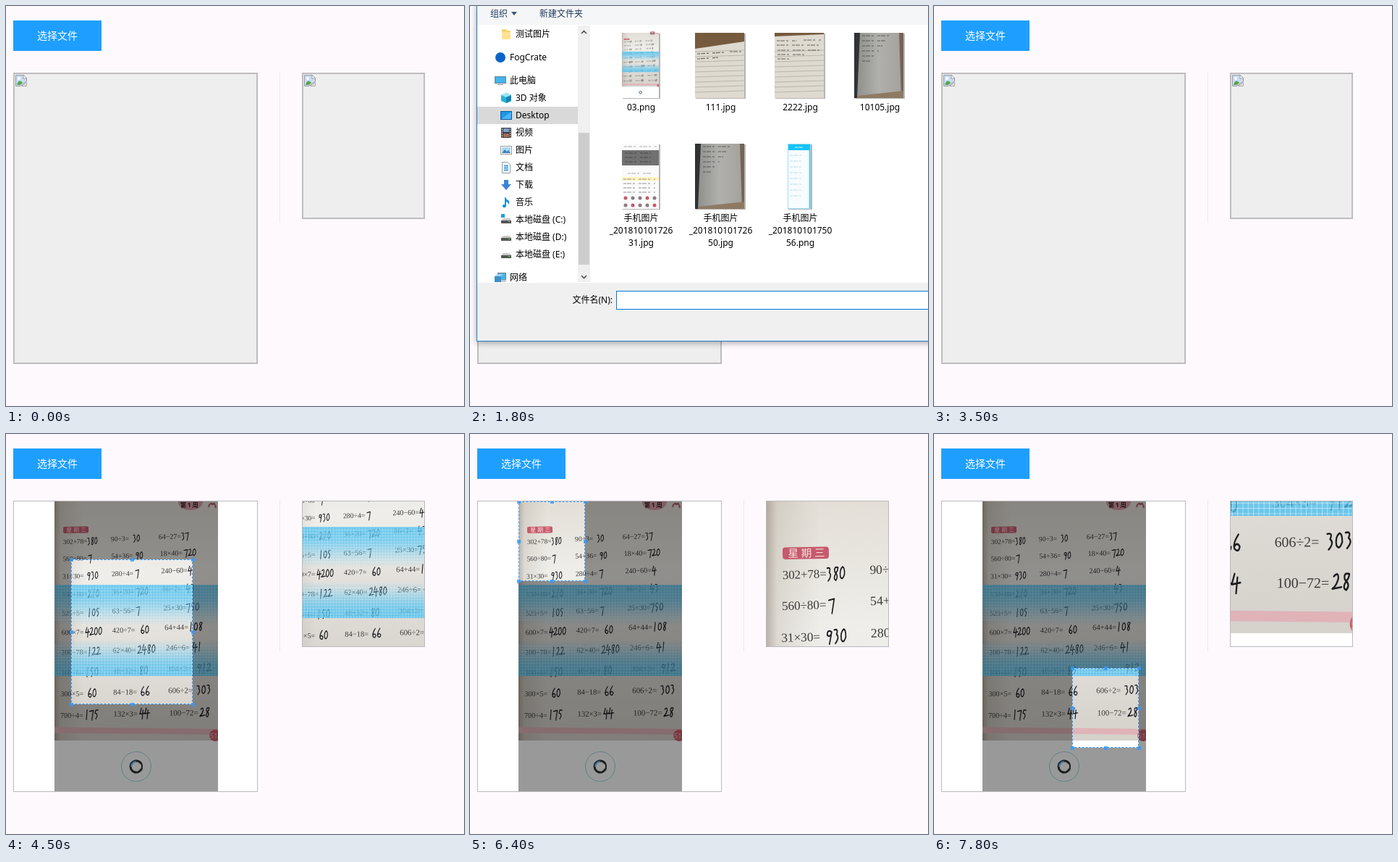
These frames come from a looping animation (633 px wide and 552 px high, 8 s). An HTML page:

```html
<!DOCTYPE html>
<html lang="zh">
<head>
<meta charset="utf-8">
<style>
html, body { margin: 0; width: 100%; height: 100%; overflow: hidden; background: #fef9fd; }
svg { display: block; }
text { font: 12px 'Noto Sans', 'Noto Sans CJK SC', 'Noto Sans CJK', sans-serif; white-space: pre; }
.print { font-family: 'Liberation Serif', serif; fill: #3c3a38; }
.hand { fill: none; stroke: #1c1c20; stroke-width: 1.1; stroke-linecap: round; stroke-linejoin: round; }
</style>
</head>
<body>
<svg id="stage" width="633" height="552"></svg>
<script>
const rect = (x, y, w, h, fill, more = '') =>
  `<rect x="${x}" y="${y}" width="${w}" height="${h}" fill="${fill}" ${more}/>`;
const path = (d, fill, more = '') => `<path d="${d}" fill="${fill}" ${more}/>`;
const line = (d, color, width = 1, more = '') =>
  path(d, 'none', `stroke="${color}" stroke-width="${width}" ${more}`);
const circle = (x, y, r, fill, more = '') => `<circle cx="${x}" cy="${y}" r="${r}" fill="${fill}" ${more}/>`;
const text = (x, y, s, more = '') => `<text x="${x}" y="${y}" ${more}>${s}</text>`;
const group = (x, y, body) => `<g transform="translate(${x} ${y})">${body}</g>`;
const frame = (x, y, w, h, color) => rect(x + .5, y + .5, w - 1, h - 1, 'none', `stroke="${color}"`);
const range = (n, f) => Array.from({ length: n }, (_, i) => f(i)).join('');
const gradient = (id, dir, ...stops) =>
  `<linearGradient id="${id}" x2="${dir == 'x' ? 1 : 0}" y2="${dir == 'y' ? 1 : 0}">` +
  stops.map(([at, c, a = 1]) => `<stop offset="${at}" stop-color="${c}" stop-opacity="${a}"/>`).join('') +
  '</linearGradient>';

// ---- worksheet photo: printed sums, handwritten answers (sum=answer,answer x) ----
const sums = `302+78=380,112 90÷3=30,175 64−27=37,242
560÷80=7,114 54+36=90,179 18×40=720,246
31×30=930,112 280÷4=7,179 240−60=4,252
130+80=210,113 36×20=720,180 86÷2=43,249
525÷5=105,113 63−56=7,180 25×30=750,249
600×7=4200,110 420÷7=60,186 64+44=108,253
200−78=122,113 62×40=2480,182 246÷6=41,258
300÷6=150,110 48+32=80,184 304×3=912,264
300×5=60,113 84−18=66,186 606÷2=303,263
700÷4=175,109 132×3=44,185 100−72=28,268`.split('\n').map(row => row.split(' '));

const digits = [
  'M3 1Q0 3 1 8Q3 11 5 6Q5 1 3 1', 'M3 0L2 10', 'M1 2Q4-1 4 3Q3 7 0 9L6 8',
  'M1 1Q5 0 3 4Q6 6 2 10', 'M2 0L0 6L6 5M4 2L3 11', 'M5 1L2 1L1 4Q6 5 2 10',
  'M4 0Q0 5 1 8Q4 11 5 7Q3 4 1 7', 'M0 2L5 1L3 11',
  'M5 1Q1 0 2 4Q6 7 3 10Q0 9 3 5Q5 3 5 1', 'M5 2Q1 0 1 4Q4 6 5 2L3 10'];

function sum(item, r, c) {
  const [, print, answer, answerX] = item.match(/(.+=)(\d+),(\d+)/);
  const x = [79, 145, 211][c] + r * [-.45, .4, 1.65][c];
  const y = [149, 145, 142][c] + r * [23, 23.2, 22.5][c] + r * r * [.4, .4, .5][c];
  const size = 9.2 + .35 * c + .12 * r, step = 5 + .17 * r + .3 * c, tall = 1.08 + .03 * r;
  const hand = [...answer].map((d, i) =>
    `<path class="hand" d="${digits[d]}" transform="translate(${+answerX + i * step} ${y - 1 - 5 * tall - i * .5}) scale(${step / 6.3} ${tall})"/>`);
  return text(x, y + size * .33, print,
    `class="print" style="font-size:${size}px" transform="rotate(${-2 + .2 * r} ${x} ${y})"`) + hand.join('');
}

const page = rect(67, 93, 226, 400, '#fff') + rect(67, 93, 226, 330, 'url(#paper)') +
  rect(67, 93, 40, 330, 'url(#spine)') +
  '<ellipse cx="255" cy="94" rx="17" ry="11" fill="#d79aa3"/>' +
  text(241, 101, '第 1 周', 'style="font-size:8px;font-weight:bold" fill="#2c2022"') +
  line('M280 101q1-6 5-4q4-2 5 5M282 96h7', '#b8606c', 2) +
  group(79, 128, `<g transform="rotate(-1)">${rect(0, 0, 35, 9, '#c65a6c', 'rx="2"')}` +
    text(4, 7.4, '星期三', 'style="font-size:8px;letter-spacing:2px" fill="#f8e4e2"') + '</g>') +
  sums.map((row, r) => row.map((item, c) => sum(item, r, c)).join('')).join('') +
  path('M67 404.5L293 407V415L67 412.5Z', '#dfb3b7') +
  path('M293 409A8 8 0 1 0 293 423Z', '#c9606a') +
  text(282, 420, '51', 'style="font-size:9px" fill="#e8c0c0"') +
  rect(67, 208, 226, 56, 'url(#scanDown)') + rect(67, 208, 226, 50, 'url(#gridDown)') +
  rect(67, 284, 226, 50, 'url(#scanUp)') + rect(67, 290, 226, 44, 'url(#gridDown)') +
  circle(180, 459, 20.5, 'none', 'stroke="#9fd6da"') +
  circle(180, 459, 8, 'none', 'stroke="#2e3436" stroke-width="3" stroke-dasharray="43 8" transform="rotate(20 180 459)"') +
  line('M173 459a7 7 0 0 1 7-7', '#58b8e0', 2) + line('M186 453l2 4v5', '#333', 2);

const defs = '<defs>' +
  gradient('paper', 'y', [0, '#e3dfd7'], [.3, '#efeeea'], [.6, '#e2dfda'], [1, '#d5d1cb']) +
  gradient('spine', 'x', [0, '#6b5a45', .4], [.2, '#6b5a45', .13], [1, '#6b5a45', 0]) +
  gradient('scanDown', 'y', [0, '#4cc0f0', .8], [.35, '#4cc0f0', .7], [1, '#4cc0f0', 0]) +
  gradient('scanUp', 'y', [0, '#4cc0f0', 0], [.65, '#4cc0f0', .7], [1, '#4cc0f0', .82]) +
  gradient('desk', 'x', [0, '#8b8b88'], [.5, '#b0b0ac'], [1, '#a3a19c']) +
  `<pattern id="gridDown" width="4" height="4" patternUnits="userSpaceOnUse">${line('M0 .3H4M.3 0V4', '#fff', .5, 'opacity=".5"')}</pattern>` +
  '<clipPath id="panelClip"><rect x="11" y="93" width="336" height="400"/></clipPath>' +
  '<clipPath id="treeClip"><rect x="10" y="27" width="139" height="354"/></clipPath>' +
  `<g id="page">${page}</g></defs>`;

// ---- upload page ----
const broken = (x, y) => group(x, y,
  path('M.5 .5H11L15.5 5V9L6 15.5H.5Z', '#c6dcf6', 'stroke="#9a9a9a"') +
  path('M2 14Q4 7 8 9L10 11L6 14Z', '#58a548') + path('M11 0V5H16Z', '#fff', 'stroke="#9a9a9a"') +
  circle(5, 5, 2, '#fff') + path('M8 15.5L15.5 10.5V15.5Z', '#e4e4e4', 'stroke="#aaa"'));
const edge = '#bbb9bd';
const base = rect(0, 0, 633, 552, '#fef9fd') + rect(10, 20, 122, 42, '#1e9fff') +
  text(71, 46, '选择文件', 'fill="#fff" text-anchor="middle" style="font-size:14px"') +
  rect(378, 92, 1, 207, '#eee9ee') +
  rect(10, 92, 338, 402, '#fff') + frame(10, 92, 338, 402, edge) +
  rect(409, 92, 170, 202, '#fff') + frame(409, 92, 170, 202, edge);
const empty = [[11, 93, 336, 400], [410, 93, 168, 200]].map(([x, y, w, h]) =>
  rect(x, y, w, h, '#eee') + frame(x, y, w, h, '#c0c0c0') + broken(x + 2, y + 2)).join('');
const cropper = '<g clip-path="url(#panelClip)"><use href="#page"/>' +
  path('', '#000', 'id="dim" fill-opacity=".4" fill-rule="evenodd"') +
  line('', '#fff', 1, 'id="outline" opacity=".6"') +
  line('', '#39f', 1, 'id="ants" stroke-dasharray="3 2"') + path('', '#39f', 'id="handles" opacity=".8"') + '</g>' +
  '<svg id="preview" x="410" y="93" width="168" height="200" preserveAspectRatio="none"><use href="#page"/></svg>';

// ---- file dialog ----
const disk = path('M1 9L4 6H13L15 9Z', '#c9c9c9') + rect(1, 9, 14, 4, '#555') + rect(11, 10, 2, 1, '#6e6');
const monitor = rect(.5, 2.5, 15, 9, '#41b5f0', 'stroke="#6d7f8c"') + rect(4, 13, 8, 1, '#789');
const icons = {
  folder: path('M2 1H8L9 3H14V15H2Z', '#f9d56e') + rect(2, 5, 12, 10, '#ffe394'),
  cloud: circle(8, 8, 7, '#0a64c8'),
  pc: monitor,
  cube: path('M8 1L15 4V12L8 15L1 12V4Z', '#29b1d8') + path('M8 1L15 4L8 7L1 4Z', '#9be4f5') + path('M8 7L15 4V12L8 15Z', '#1387b5'),
  desktop: rect(.5, 2.5, 15, 11, '#1e96e8', 'stroke="#0d5c99"') + path('M1 13L15 3V13Z', '#4bb4f7'),
  video: rect(1, 1, 14, 14, '#3a3a3e') + rect(4, 2, 8, 5, '#7aa0c8') + rect(4, 9, 8, 5, '#a86a58') +
    line('M2.5 2V15M13.5 2V15', '#ddd', 1, 'stroke-dasharray="2 1"'),
  picture: rect(.5, 2.5, 15, 11, '#fff', 'stroke="#999"') + rect(2, 4, 12, 8, '#a9d8f5') + path('M2 12L6 7L9 10L11 8L14 12Z', '#4080b8'),
  doc: path('M2.5 .5H10L13.5 4V15.5H2.5Z', '#fff', 'stroke="#8a9aa8"') + line('M5 5.5H11M5 8.5H11M5 11.5H11', '#3fa0dc', 2),
  down: path('M5 1H11V7H15L8 15L1 7H5Z', '#3a86d8'),
  music: path('M7 1Q8 4 12 6Q13 9 11 11Q11 8 8 7V13Q7 16 4 15Q2 13 4 11L6 11V1Z', '#1c8fe0'),
  system: disk + rect(1, 0, 5, 5, '#1ba1e2'),
  disk,
  net: group(4, -1, monitor.replace(/"15"/, '"11"')) + rect(0, 6, 9, 8, '#3d8fc8') + path('M0 6L4 3H12L9 6Z', '#9ed0ee')
};
const tree = [
  [63, 39, '测试图片', 'folder'], [55, 71, 'FogCrate', 'cloud'], [55, 103, '此电脑', 'pc'],
  ...[['3D 对象', 'cube'], ['Desktop', 'desktop'], ['视频', 'video'], ['图片', 'picture'], ['文档', 'doc'],
    ['下载', 'down'], ['音乐', 'music'], ['本地磁盘 (C:)', 'system'], ['本地磁盘 (D:)', 'disk'], ['本地磁盘 (E:)', 'disk']]
    .map(([name, icon], i) => [63, 127 + 24 * i, name, icon]),
  [55, 375, '网络', 'net']
].map(([x, y, name, icon]) => group(x - 21, y - 8, icons[icon]) + text(x, y + 4, name)).join('');

// thumbnails are drawn in their own box, 90 px high
const scribble = (d, color = '#444') => line(d, color, 1.2, 'stroke-dasharray="4 1 6 2 3 5" opacity=".8"');
const lined = (top, writing) => rect(0, 0, 68, 90, '#dfdad0') + path(top, '#765a3e') +
  range(9, i => line(`M0 ${26 + i * 7}L68 ${24 + i * 7}`, '#aaa69e', .7)) + scribble(writing);
const grayNote = rect(0, 0, 68, 90, 'url(#desk)') + path('M0 0H8L4 90H0Z', '#303234') +
  path('M62 0H68V90H65Z', '#746453') + path('M4 87L68 80V90H4Z', '#8e7a63') +
  range(6, i => scribble(`M11 ${4 + i * 7}h${38 - i * 5}`, '#44484c'));
const phone = rect(0, 0, 51, 90, '#fafafa') + scribble('M3 4H48', '#999') + rect(0, 9, 51, 21, '#707170') +
  range(3, i => scribble(`M4 ${13 + i * 6}h36`, '#3c3c3c')) + scribble('M8 41H42', '#999') +
  rect(0, 46, 51, 5, '#fff4bd') + range(4, i => scribble(`M2 ${49 + i * 6}H46`, '#777')) +
  range(10, i => circle(5 + i % 5 * 10, 75 + (i > 4) * 10, 2.5, i % 3 ? '#8b7b80' : '#c85a68'));
const app = rect(0, 0, 32, 90, '#f7fcff') + rect(0, 0, 32, 9, '#14c4ff') + scribble('M10 5H22', '#fff') +
  range(8, i => scribble(`M3 ${16 + i * 8}H22`, '#a9d5ea')) + rect(30, 0, 2, 90, '#14c4ff') + frame(0, 0, 32, 90, '#9edcf5');
const files = [
  [['03.png'], 51, '<use href="#page" transform="scale(.2257 .225) translate(-67 -93)"/>'],
  [['111.jpg'], 68, lined('M0 0H68V12L0 22Z', 'M3 29L40 27M48 26H66M3 36L32 34')],
  [['2222.jpg'], 68, lined('M0 0H68V2L0 5Z', 'M3 11H30M40 10H64M3 17H62M4 24H64M4 30H46M4 36H20')],
  [['10105.jpg'], 68, grayNote],
  [['手机图片', '_201810101726', '31.jpg'], 51, phone],
  [['手机图片', '_201810101726', '50.jpg'], 68, grayNote],
  [['手机图片', '_201810101750', '56.png'], 32, app]
].map(([names, w, art], i) => {
  const mid = 236.5 + i % 4 * 110, top = i < 4 ? 37 : 190, left = Math.ceil(mid - 1.5 - w / 2);
  return rect(left + 1, top + 1, w + 1, 90, '#b5b5b5') + group(left, top, art) +
    names.map((s, n) => text(mid, top + 107 + 17 * n, s, 'text-anchor="middle"')).join('');
}).join('');

const dialog = rect(9, -5, 640, 468, '#f0f0f0', 'style="filter:drop-shadow(0 2px 4px #0005)"') +
  rect(10, 0, 623, 26, '#f5f6f7') + rect(10, 26, 623, 356, '#fff') +
  line('M9.5 0V462.5H633', '#1a7fce') +
  '<g id="content">' +
  text(28, 15, '组织', 'fill="#1e395b"') + path('M57 8H65L61 13Z', '#3b5678') + text(96, 15, '新建文件夹', 'fill="#1e395b"') +
  rect(10, 139, 139, 24, '#d9d9d9') + `<g clip-path="url(#treeClip)">${tree}</g>` +
  rect(149, 27, 17, 354, '#f0f0f0') + rect(150, 175, 15, 182, '#cdcdcd') +
  line('M154 38L157.500 34.500L161 38M154 372L157.500 375.500L161 372', '#505050', 1.6) +
  rect(184.5, 33.5, 104, 117, '#cce8ff', 'id="highlight"') + files +
  text(197, 410, '文件名(N):', 'text-anchor="end"') +
  rect(202.5, 393.5, 440, 25, '#fff', 'id="field"') +
  rect(206, 398, 1, 17, '#000', 'id="caret"') + text(206, 410, '03.png', 'id="chosen"') + '</g>';

document.getElementById('stage').innerHTML = defs + base +
  `<g id="empty">${empty}</g><g id="loaded">${cropper}</g><g id="dialog">${dialog}</g>`;

// ---- motion ----
const el = id => document.getElementById(id);
const set = (id, attrs) => { for (const k in attrs) el(id).setAttribute(k, attrs[k]); };
const show = (id, on) => { el(id).style.display = on ? '' : 'none'; };

// time, x, y, width, height of the crop box
const cropKeys = [
  [3700, 96, 193, 168, 200], [4400, 96, 193, 168, 200], [4900, 67, 93, 168, 200], [5900, 67, 93, 168, 200],
  [6400, 67, 93, 92, 110], [6800, 67, 93, 92, 110], [7200, 186, 110, 92, 110], [7700, 190, 314, 92, 110],
  [7800, 191, 323, 92, 110]];

function cropAt(t) {
  const i = cropKeys.findIndex(k => k[0] > t);
  if (i < 0) return cropKeys.at(-1).slice(1);
  const a = cropKeys[i - 1], b = cropKeys[i], p = (t - a[0]) / (b[0] - a[0]);
  return a.slice(1).map((v, n) => Math.round(v + (b[n + 1] - v) * p));
}

function drawCrop(t) {
  const [x, y, w, h] = cropAt(t);
  const hole = `M${x} ${y}h${w}v${h}h${-w}z`;
  const border = { d: `M${x + .5} ${y + .5}h${w - 1}v${h - 1}h${1 - w}z` };
  set('dim', { d: 'M67 93h226v400h-226z' + hole });
  set('outline', border);
  set('ants', border);
  set('handles', { d: range(9, i => i == 4 ? '' :
    `M${Math.round(x + i % 3 * w / 2) - 2} ${Math.round(y + Math.floor(i / 3) * h / 2) - 2}h5v5h-5z`) });
  set('preview', { viewBox: `${x} ${y} ${w} ${h}` });
}

function drawDialog(t) {
  const item = t < 1800 ? 6 : t < 1900 ? -1 : t < 2000 ? 1 : 0;
  const picked = t >= 2500;
  show('content', t >= 1300);
  show('highlight', item >= 0);
  set('highlight', {
    x: 184.5 + item % 4 * 110, y: item > 3 ? 186.5 : 33.5, height: item > 3 ? 156 : 117,
    opacity: Math.min(1, .5 + Math.max(0, t - 2400) / 1000), stroke: t >= 3300 ? '#99d1ff' : 'none'
  });
  set('field', { stroke: picked ? '#7a7a7a' : '#0078d7' });
  show('caret', t < 1800 || t >= 2200 && !picked);
  show('chosen', picked);
}

function draw() {
  const t = Math.floor(performance.now() % 8000 / 100) * 100;
  const open = t >= 1100 && t < 3500, loaded = t >= 3700;
  show('empty', !loaded);
  show('loaded', loaded);
  show('dialog', open);
  if (open) drawDialog(t);
  if (loaded) drawCrop(t);
  requestAnimationFrame(draw);
}
draw();
</script>
</body>
</html>
```
